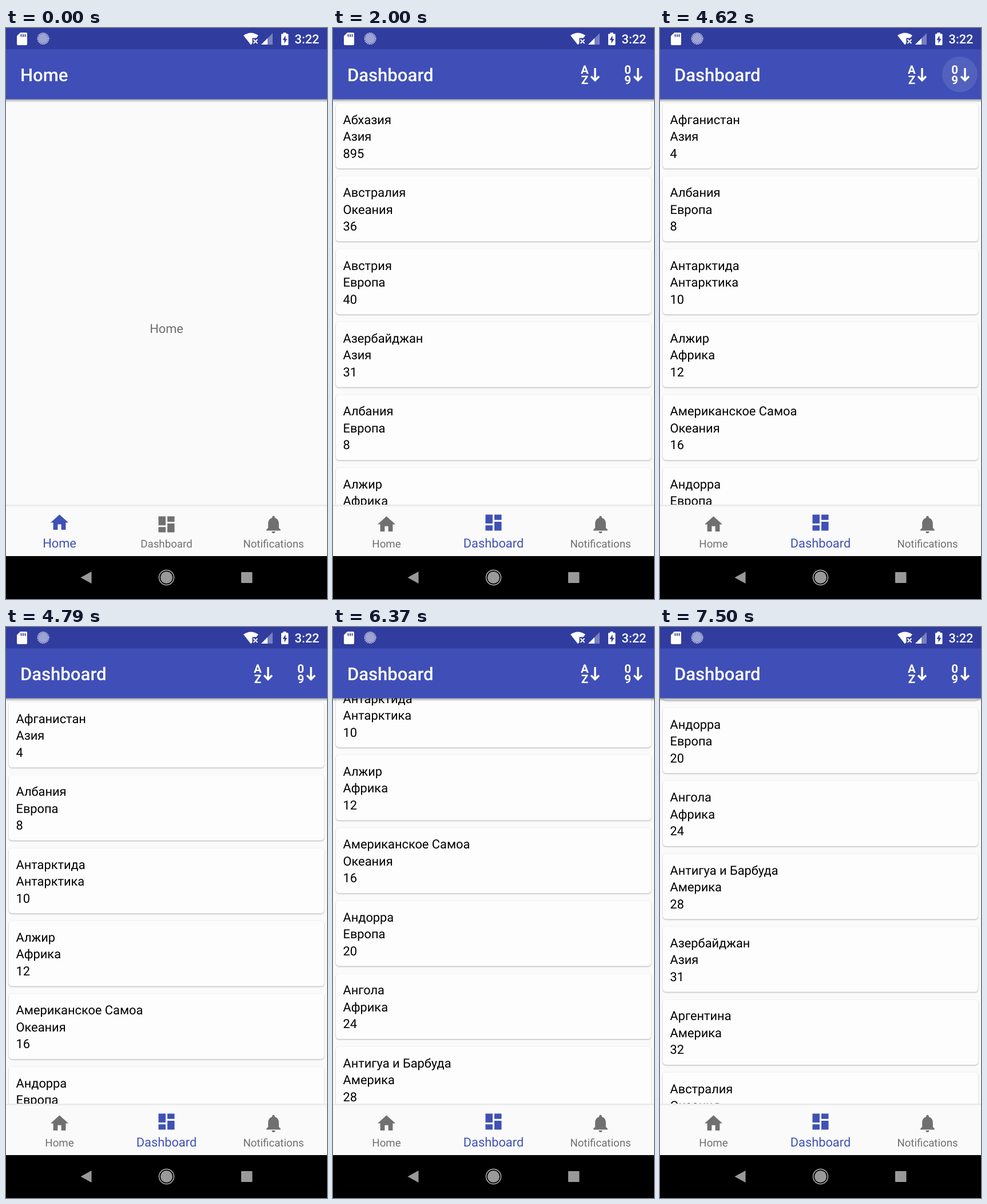
An HTML page that plays this animation: 561 by 998 pixels, repeating every 8000 ms.

```html
<!DOCTYPE html>
<html lang="en">
<head>
<meta charset="utf-8">
<title>Sortable list</title>
<style>
  html, body { margin: 0; width: 100%; height: 100%; overflow: hidden; background: #fafafa; }
  svg { display: block; width: 100%; height: 100%; font: 21.8px Roboto, sans-serif; text-rendering: geometricPrecision; }
  .title { font-size: 31.1px; font-weight: 500; fill: #fff; }
  .clock { font-weight: 500; fill: #fff; }
  .sort { font-size: 20.5px; font-weight: 700; fill: #fff; text-anchor: middle; }
  .sort path { fill: none; stroke: #fff; stroke-width: 3.4; }
  .card { fill: #fdfdfd; filter: drop-shadow(0 1px 1px rgba(0, 0, 0, .3)); }
  .mid { text-anchor: middle; }
</style>
</head>
<body>
<svg viewBox="0 0 561 998">
  <defs>
    <clipPath id="listArea"><rect y="124" width="561" height="712"/></clipPath>
    <clipPath id="navArea"><rect y="836" width="561" height="87"/></clipPath>
    <linearGradient id="shade" x2="0" y2="1">
      <stop stop-color="#000" stop-opacity=".33"/>
      <stop offset="1" stop-color="#000" stop-opacity="0"/>
    </linearGradient>
  </defs>
  <rect width="561" height="998" fill="#fafafa"/>
  <text id="page" class="mid" x="280.5" y="533" fill="#6f6f6f"></text>
  <g clip-path="url(#listArea)"><g id="byName"></g><g id="byCode"></g></g>

  <!-- app bar -->
  <rect y="124.7" width="561" height="5.3" fill="url(#shade)"/>
  <rect y="37" width="561" height="87.7" fill="#3f4fb7"/>
  <rect width="561" height="37.4" fill="#303d9f"/>
  <text id="title" class="title" x="24.9" y="93"></text>
  <circle id="sortRipple" cx="524" cy="81" fill="#fff"/>
  <g id="menu"></g>

  <!-- status bar -->
  <path d="M25 8h10q2 0 2 2v18q0 2-2 2H21q-2 0-2-2V14z" fill="#fff"/>
  <path d="M26.5 11v4.5m3.5-4.5v4.5m3.5-4.5v4.5" stroke="#303d9f" stroke-width="1.8"/>
  <circle cx="65" cy="18.5" r="8.5" fill="#9da4d3"/>
  <circle cx="65" cy="18.5" r="9.5" fill="none" stroke="#c3c8e6" stroke-width="2" stroke-dasharray="2 1"/>
  <path d="M428 29.5 415 13Q428 4 441 13L437.5 17.5H430.5V26.5z" fill="#fff"/>
  <path d="m432.5 20 7 7m0-7-7 7" stroke="#fff" stroke-width="2"/>
  <path d="M446 29 466 9V29z" fill="#fff" opacity=".35"/>
  <path d="M446 29 457 18V29z" fill="#fff"/>
  <path d="M484.5 10V8h5v2h2.500q1.500 0 1.500 1.500V28.500q0 1.500-1.500 1.500h-9.500q-1.500 0-1.500-1.500V11.500q0-1.500 1.500-1.500z" fill="#fff"/>
  <path d="M488.5 13 483.5 21h3v6l5-8h-3z" fill="#303d9f"/>
  <text class="clock" x="504.5" y="27.4">3:22</text>

  <!-- bottom tabs -->
  <rect y="833" width="561" height="3" fill="#ececec"/>
  <rect y="836" width="561" height="87" fill="#fafafa"/>
  <g clip-path="url(#navArea)">
    <circle id="noteRipple" cx="467.5" cy="879.5"/>
    <circle id="dashRipple" cx="280.5" cy="879.5"/>
  </g>
  <g id="tabs"></g>

  <!-- system buttons -->
  <rect y="923" width="561" height="75"/>
  <g fill="#999">
    <path d="M130.5 960.5 149.5 950v21z"/>
    <circle cx="280.5" cy="960.5" r="10.5"/>
    <circle cx="280.5" cy="960.5" r="13" fill="none" stroke="#b5b5b5" stroke-width="1.5"/>
    <rect x="411" y="951" width="19.5" height="19" rx="1"/>
  </g>
</svg>
<script>
const $ = id => document.getElementById(id);
const LOOP = 8000, PITCH = 127.4;
const NOTE_AT = 120, DASH_AT = 2000, SORT_AT = 4370;

const countries = `Афганистан,Азия,4
Албания,Европа,8
Антарктида,Антарктика,10
Алжир,Африка,12
Американское Самоа,Океания,16
Андорра,Европа,20
Ангола,Африка,24
Антигуа и Барбуда,Америка,28
Азербайджан,Азия,31
Аргентина,Америка,32
Австралия,Океания,36
Австрия,Европа,40
Абхазия,Азия,895`.split("\n").map(line => line.split(","));

const card = (fields, i) => `<g transform="translate(0 ${131.6 + i * PITCH})">
  <rect class="card" x="5" width="551" height="114" rx="5.5"/>
  ${fields.map((s, k) => `<text x="17.5" y="${36.2 + k * 29.5}">${s}</text>`).join("")}</g>`;
$("byCode").innerHTML = countries.map(card).join("");
$("byName").innerHTML = [...countries].sort((a, b) => a[0].localeCompare(b[0], "ru"))
  .slice(0, 6).map(card).join("");

const sortIcon = (x, top, bottom) => `<g class="sort" transform="translate(${x})">
  <text y="80">${top}</text><text y="98">${bottom}</text>
  <path d="M18 70V92M11 84.5l7 7 7-7"/></g>`;
$("menu").innerHTML = sortIcon(440, "A", "Z") + sortIcon(515, "0", "9");

const tabs = [
  ["Home", "M10 20v-6h4v6h5v-8h3L12 3 2 12h3v8z"],
  ["Dashboard", "M3 13h8V3H3zm0 8h8v-6H3zm10 0h8V11h-8zm0-18v6h8V3z"],
  ["Notifications", "M12 22c1.1 0 2-.9 2-2h-4c0 1.1.89 2 2 2zm6-6v-5c0-3.07-1.64-5.64-4.5-6.32V4c0-.83-.67-1.5-1.5-1.5s-1.5.67-1.5 1.5v.68C7.63 5.36 6 7.92 6 11v5l-2 2v1h16v-1z"]
];
$("tabs").innerHTML = tabs.map(([name, d], i) =>
  `<g><path d="${d}"/><text class="mid" x="${93.5 + 187 * i}" y="908">${name}</text></g>`).join("");

const span = (t, from, to) => Math.min(1, Math.max(0, (t - from) / (to - from)));
const easeOut = (p, power) => 1 - (1 - p) ** power;
const show = (id, on) => $(id).style.display = on ? "" : "none";

function ripple(id, t, start, length, radius, alpha) {
  const p = span(t, start, start + length);
  $(id).setAttribute("r", radius * easeOut(Math.min(1, p * 1.8), 2));
  $(id).setAttribute("opacity", alpha * Math.min(1, p * 8) * (1 - span(p, .4, 1)));
}

function drawTab(i, weight, selected) {
  const tab = $("tabs").children[i];
  tab.setAttribute("fill", selected ? "#3f51b5" : "#707070");
  tab.firstChild.setAttribute("transform",
    `translate(${74.8 + 187 * i} ${848.9 - 3.1 * weight}) scale(1.558)`);
  tab.lastChild.style.fontSize = 18.7 + 3.1 * weight + "px";
}

// Two swipes, each settling on a whole pixel
function scrollAt(t) {
  return Math.round(330 * easeOut(span(t, 6080, 6540), 2.1) + 297 * easeOut(span(t, 6750, 7160), 3.83));
}

function draw(t) {
  const dash = t >= DASH_AT, sorted = t >= SORT_AT;
  const current = dash ? 1 : t >= NOTE_AT ? 2 : 0;
  const move = span(t, NOTE_AT, NOTE_AT + 115);
  const weights = dash ? [0, 1, 0] : [1 - move, 0, move];
  weights.forEach((w, i) => drawTab(i, w, i === current));

  $("title").textContent = tabs[current][0];
  $("page").textContent = dash ? "" : tabs[current][0];
  show("menu", dash);
  show("byName", dash && !sorted);
  show("byCode", sorted);
  $("byCode").setAttribute("transform", `translate(0 ${-scrollAt(t)})`);

  ripple("noteRipple", t, 30, 760, 103, .12);
  ripple("dashRipple", t, 950, 800, 103, .12);
  ripple("sortRipple", t, 4245, 545, 31, .2);
}

const begin = performance.now();
function tick() {
  draw((performance.now() - begin) % LOOP);
  requestAnimationFrame(tick);
}
tick();
</script>
</body>
</html>
```
